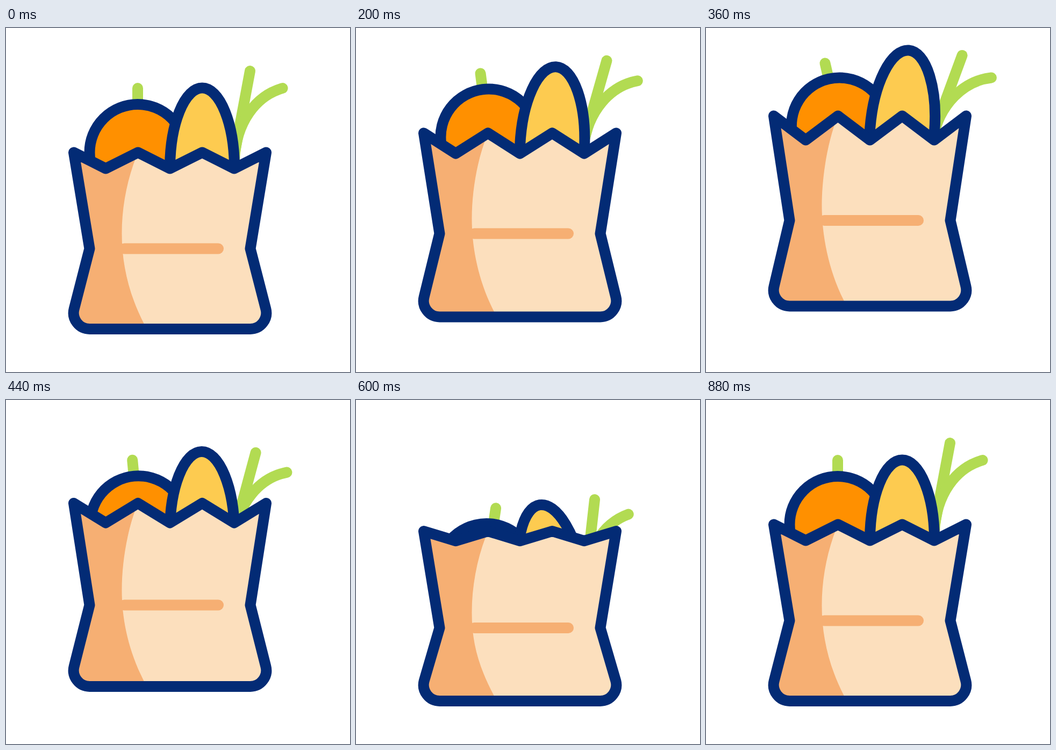
Write an HTML page that moves like this. It is 640 px wide and 640 px high and loops after 1480 ms.

```html
<!DOCTYPE html>
<html lang="en">
<head>
<meta charset="utf-8">
<title>Grocery bag</title>
<style>
  html, body { margin: 0; height: 100%; overflow: hidden; background: #fff; }
  svg { display: block; width: 100%; height: 100%; }
  path, circle, ellipse { stroke-width: 20; stroke-linecap: round; stroke-linejoin: round; }
  .ink { stroke: #032b75; }
  .green { stroke: #b2db52; fill: none; }
</style>
</head>
<body>
<svg viewBox="0 0 640 640">
  <g id="leek" class="green">
    <path d="M454 80L425 235"/>
    <path d="M514.5 112C465 126 428 175 425 245V265"/>
  </g>
  <g id="orange">
    <path class="green" d="M245 112V150"/>
    <circle class="ink" cx="245" cy="231.5" r="89.5" fill="#ff9000"/>
  </g>
  <g id="bread">
    <ellipse class="ink" cx="365" cy="261.5" rx="60" ry="150" fill="#fdcb50"/>
  </g>
  <clipPath id="inside"><path id="clip"/></clipPath>
  <path id="paper" fill="#fcdfbd"/>
  <path id="shade" fill="#f6af73" clip-path="url(#inside)"/>
  <path id="fold" stroke="#f6af73"/>
  <path id="outline" class="ink" fill="none"/>
</svg>
<script>
const LOOP = 1480, STEP = 40;
const $ = id => document.getElementById(id);

// Rise, fall, squashed hold, recovery
const times = [20, 200, 360, 400, 440, 500, 590, 862];

// Offsets at two points of the rise, during the fall, and when squashed
const tracks = {
  peak: [-36, -68, -39.5, 13],
  valley: [-28, -53, -33, 0.7],
  waist: [-28, -52.5, -29, 14],
  base: [-22.5, -42.5, -27, 0],
  orangeY: [-28.4, -49.1, -0.7, 91.5],
  orangeTurn: [-7.4, -13, -5.4, 8.6],
  breadY: [-39.5, -70.5, -15.5, 85],
  breadTurn: [2.7, 4.7, -0.4, -9.3],
  leekY: [-19.7, -30.8, 17.6, 108.7],
  leekTurn: [5.3, 9.6, 4.5, -4.4]
};

function value([low, high, fall, squash], t) {
  const top = high + (high - low) / 4;
  const keys = [0, low, high, top, fall, squash, squash, 0];
  if (t <= times[0]) return 0;
  const i = times.findIndex(time => t < time);
  if (i < 0) return 0;
  const k = (t - times[i - 1]) / (times[i] - times[i - 1]);
  return keys[i - 1] + (keys[i] - keys[i - 1]) * k;
}

function place(id, y, turn, cx, cy) {
  $(id).setAttribute("transform", `translate(0 ${y}) rotate(${turn} ${cx} ${cy})`);
}

function draw(now) {
  const t = Math.floor(now % LOOP / STEP) * STEP;
  const v = {};
  for (const name in tracks) v[name] = value(tracks[name], t);

  place("leek", v.leekY, v.leekTurn, 455, 215);
  place("orange", v.orangeY, v.orangeTurn, 245, 216.5);
  place("bread", v.breadY, v.breadTurn, 365, 261.5);

  const peak = 231.5 + v.peak, valley = 261.5 + v.valley;
  const waist = 410.5 + v.waist, base = 560 + v.base;
  const zigzag = [126, 185.5, 245.5, 305, 365, 424.5, 484]
    .map((x, i) => `${x} ${i % 2 ? valley : peak}`).join("L");
  const bag = `M${zigzag}L454.5 ${waist}L483.3 ${base - 37.5}A30 30 0 0 1 454.5 ${base}
    H155.5A30 30 0 0 1 126.7 ${base - 37.5}L155.5 ${waist}Z`;
  for (const id of ["clip", "paper", "outline"]) $(id).setAttribute("d", bag);

  $("shade").setAttribute("d", `M245.5 ${peak}
    C226 ${peak + 46.5} 215.5 ${waist - 80} 215.5 ${waist - 28}
    C215.5 ${waist + 30} 229 ${base - 60} 262 ${base}H100V${peak}Z`);
  $("fold").setAttribute("d", `M220 ${waist}H395`);
  requestAnimationFrame(draw);
}
draw(performance.now());
</script>
</body>
</html>
```
